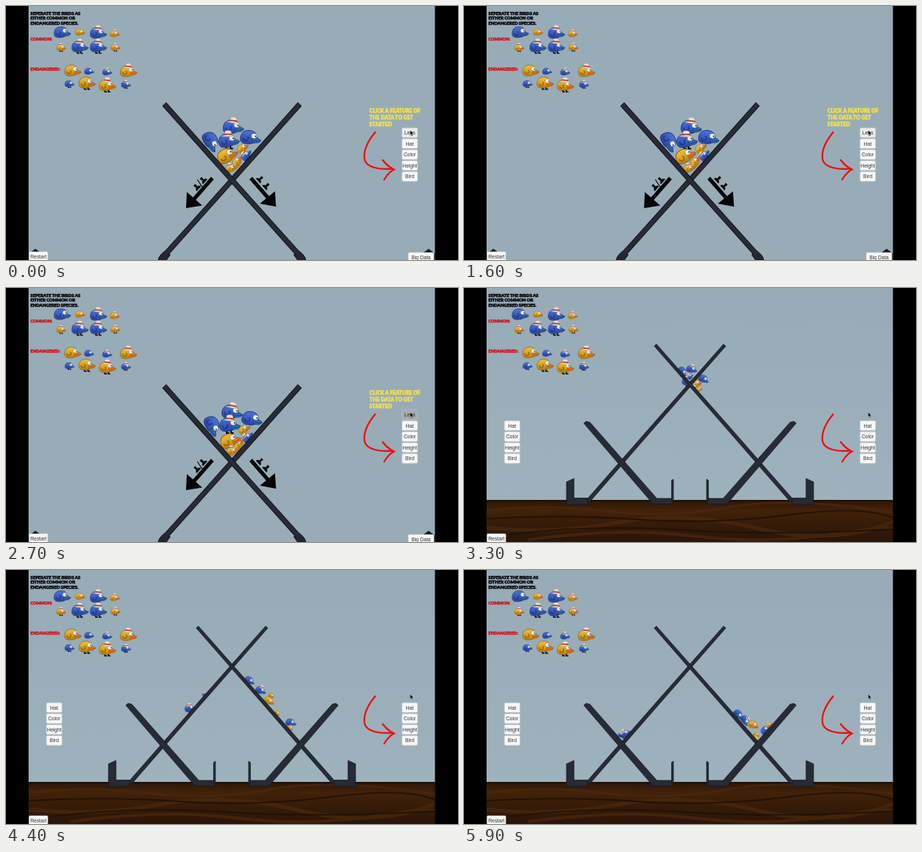
An HTML page that plays this animation: 600 px wide and 338 px high, repeating every 6 s.

```html
<!DOCTYPE html>
<html lang="en">
<head>
<meta charset="utf-8">
<title>Sort the birds</title>
<style>
html, body { margin: 0; width: 100%; height: 100%; overflow: hidden; background: #000; }
svg { display: block; width: 100vw; height: 100vh; }
.chunky { font-family: Lato, sans-serif; font-weight: 900; stroke-width: .5; }
.ui { font: 6.7px "Liberation Sans", Arial, sans-serif; fill: #323232; text-anchor: middle; }
</style>
</head>
<body>
<svg id="stage" viewBox="0 0 600 338">
  <defs>
    <linearGradient id="sky" x2="0" y2="1">
      <stop offset="0" stop-color="#97abb7"/><stop offset="1" stop-color="#9db2bc"/>
    </linearGradient>
    <linearGradient id="floor" x2="0" y2="1">
      <stop offset="0" stop-color="#2b1708"/><stop offset=".25" stop-color="#422209"/>
      <stop offset=".6" stop-color="#351b08"/><stop offset="1" stop-color="#2a1507"/>
    </linearGradient>
    <linearGradient id="blue" x2="0" y2="1">
      <stop offset="0" stop-color="#4a74d6"/><stop offset=".5" stop-color="#3a5cc4"/><stop offset="1" stop-color="#2a4298"/>
    </linearGradient>
    <linearGradient id="gold" x2="0" y2="1">
      <stop offset="0" stop-color="#efc043"/><stop offset=".5" stop-color="#dda41f"/><stop offset="1" stop-color="#b57a12"/>
    </linearGradient>
    <clipPath id="view"><rect x="30" y="0" width="539.4" height="338"/></clipPath>
    <g id="leg1">
      <path d="M211 326L218 331L213 338H202Q203 332 211 326Z" fill="#222730" stroke="#12151a"/>
      <path id="beam" d="M390 130.5L300 231.7L213 329" fill="none" stroke="#12151a" stroke-width="7.2"/>
      <path d="M389.500 131L300 231.7L212 330" fill="none" stroke="#272c36" stroke-width="5.2"/>
      <path d="M30 330L39 323L47 329V338H30Z" fill="#16181c"/>
    </g>
    <g id="half2" fill="#262b35" stroke="#14171c" stroke-width=".7">
      <path d="M344.500 74.700L347.500 77.300L256.500 181.500L167 284.500L162.500 282L253 178.500Z"/>
      <path d="M159 180L162 177.500L167 178.500L256 280H277V287.500H251Z"/>
      <path d="M275.500 256L278 254.500V284H275.500Z"/>
      <path d="M136 258L146 253.500V279.500H164V288H136Z"/>
    </g>
    <path id="foot" d="M-4.500 3Q-4 0 -1.500 -.5L-2 -5H1.500L1.200 -.5Q4 0 4.500 3Z" fill="#08090b"/>
    <g id="feet"><use href="#foot" x="-6.200"/><use href="#foot" x="6.200"/></g>
  </defs>

  <g clip-path="url(#view)">
    <g id="scene1">
      <rect x="30" width="540" height="338" fill="#98acb7"/>
      <g id="pile"></g>
      <use href="#leg1"/><use href="#leg1" transform="matrix(-1 0 0 1 600 0)"/>
      <g fill="#050506" stroke="#050506">
        <path d="M274 229L246 261M325 229L352 260" stroke-width="5"/>
        <path d="M239 269L240 247.500L260.500 265.500ZM358.500 267L357 246.500L337 263Z" stroke="none"/>
      </g>
      <use href="#feet" transform="translate(258 236.500) rotate(-48)"/>
      <path d="M254 231L262 243" stroke="#08090b" stroke-width="1.200"/>
      <use href="#feet" transform="translate(341 235.500) rotate(48)"/>
      <g class="chunky" font-size="6.800" fill="#f2e04c" stroke="#f2e04c">
        <text x="482.500" y="142">CLICK A FEATURE OF</text>
        <text x="482.500" y="151">THE DATA TO GET</text>
        <text x="482.500" y="160">STARTED</text>
      </g>
    </g>

    <g id="scene2">
      <rect x="30" width="540" height="284" fill="url(#sky)"/>
      <g id="slide"></g>
      <rect x="30" y="282" width="540" height="56" fill="url(#floor)"/>
      <g fill="none" stroke="#4b290e" stroke-width="3" opacity=".7">
        <path d="M30 296Q110 287 190 297T350 292T570 298" />
        <path d="M30 319Q120 328 205 312T390 320T570 311" stroke-width="5"/>
        <path d="M85 335Q210 318 305 330T500 326T570 332" stroke-width="4"/>
      </g>
      <g fill="none" stroke="#1c0e05" stroke-width="1.800" opacity=".8">
        <path d="M30 283H570M30 307Q130 301 230 308T430 302T570 306"/>
        <path d="M60 328Q170 314 290 322T570 321"/>
      </g>
      <use href="#half2"/><use href="#half2" transform="matrix(-1 0 0 1 600 0)"/>
    </g>

    <g class="chunky" font-size="5.700" fill="#07080a" stroke="#07080a">
      <text x="32.500" y="11.800">SEPERATE THE BIRDS AS</text>
      <text x="32.500" y="18.400">EITHER COMMON OR</text>
      <text x="32.500" y="25">ENDANGERED SPECIES.</text>
    </g>
    <g class="chunky" font-size="5.500" fill="#d3141c" stroke="#d3141c">
      <text x="32.500" y="45.500">COMMON:</text>
      <text x="32.500" y="86.300">ENDANGERED:</text>
    </g>
    <g id="legend"></g>
    <g id="buttons"></g>
    <path d="M490 168C481 179 474 192 476 204C478 215 496 218 513 216.500M500 205Q507 214 515 217.500Q508 221 502 231"
      fill="none" stroke="#f00c0c" stroke-width="2.200" stroke-linecap="round"/>
    <path d="M536.500 165.500V171.500L537.900 170.200L539 172.500L540 172L539 169.800H541Z" fill="#0a0a0a" stroke="#ddd" stroke-width=".3"/>
  </g>
</svg>
<script>
const NS = "http://www.w3.org/2000/svg";
const $ = id => document.getElementById(id);

function add(parent, tag, attrs, text) {
  const el = document.createElementNS(NS, tag);
  for (const k in attrs) el.setAttribute(k, attrs[k]);
  if (text) el.textContent = text;
  parent.appendChild(el);
  return el;
}

// Kind: B/Y big, b/y small (blue or yellow); h adds a hat, l adds legs.
function bird(parent, kind) {
  const g = add(parent, "g", {});
  const blue = /[Bb]/.test(kind);
  const [body, dark, beak] = blue ? ["url(#blue)", "#22367f", "#2f6aa8"] : ["url(#gold)", "#8f5f10", "#e0701e"];
  const path = (d, fill, line = "none", w = .6) =>
    add(g, "path", { d, fill, stroke: line, "stroke-width": w });
  if (kind.includes("l")) path("M-3 6V9.500H0M2 6V9.500H5", "none", "#0b0b0d", 1.8);
  path("M-11 2C-11 -5 -7 -8 -1 -8C5 -8 7.500 -5 8 0C8 5 3 7.500 -2 7.500C-7 8 -11 7 -11 2Z", body, dark, .8);
  path("M3 1Q8 -2 13 1.500Q12 5.500 4 5.500Q2 3.500 3 1Z", beak, dark);
  path("M4 3.300Q9 3.500 12.500 2", "none", dark, .7);
  path("M-8 1Q-7 5.500 -3 3.500Q-.5 1.500 -3 -1", "none", dark, 1.3);
  add(g, "ellipse", { cx: 4.4, cy: -2.4, rx: 3.3, ry: 3, fill: "#e6ebf0", stroke: dark, "stroke-width": .4 });
  add(g, "circle", { cx: 6, cy: -2.2, r: .8, fill: "#111" });
  if (kind.includes("h")) {
    path("M-3.500 -6.500L-3 -11Q1 -12.500 4 -10.500L4.500 -6Z", "#e9e0d0", "#9a8f80", .4);
    path("M-3.600 -8.300L4.400 -7.800V-6L-3.800 -6.500Z", "#b8322c");
    path("M-8 -5.800Q0 -7.800 8 -4.800Q1 -3.600 -8 -5.800Z", "#efe7d8", "#9a8f80", .4);
  }
  g.size = /[BY]/.test(kind) ? 1 : .58;
  return g;
}

function put(g, x, y, r = 0, scale = 1) {
  g.setAttribute("transform", `translate(${x} ${y}) rotate(${r}) scale(${g.size * scale})`);
}

const legend = [
  ["B", 74, 35], ["y", 98, 35], ["Bh", 122, 36], ["yh", 144, 37],
  ["yhl", 73, 55.5], ["Bhl", 97.5, 54], ["Bhl", 122, 54], ["yhl", 145, 55],
  ["Y", 88, 86], ["b", 110, 87], ["bh", 134, 88], ["Yh", 162, 87],
  ["bl", 84, 103.5], ["Yl", 107, 102], ["Yhl", 134, 105.5], ["bhl", 159, 104.5]
];
for (const [kind, x, y] of legend) put(bird($("legend"), kind), x, y, 0, .92);

function button(x, y, w, h, label) {
  const g = add($("buttons"), "g", {});
  g.face = add(g, "rect", { x: x - w / 2, y: y - h / 2, width: w, height: h, rx: 1.4, fill: "#f7f7f7", stroke: "#c5c9cb", "stroke-width": .5 });
  add(g, "text", { x, y: y + 2.4, class: "ui" }, label);
  return g;
}
const labels = ["Hat", "Color", "Height", "Bird"];
const column = x => labels.map((s, i) => button(x, 183.2 + i * 14.55, 20.5, 12.8, s));
const legs = button(536, 168.6, 20.5, 12.8, "Legs");
column(536);
const leftSide = column(64);
button(43, 333.5, 25, 13, "Restart");
const bigData = button(551, 334.3, 34, 12.5, "Big Data");

// Heap: id, kind, x, y, turn, then the shift as it settles.
const heap = [
  ["A", "B", 272, 180, 62, 2, 3], ["B", "Bh", 301, 161, 3, -1.5, 4],
  ["C", "B", 324, 175, 8, 2, -1], ["D", "Bhl", 295, 179, -4, 1.5, 3],
  ["F", "y", 314, 189, -35, 2, -1], ["G", "bhl", 319, 199, -58, 2, 0],
  ["H", "y", 307, 207, -60, 2, 1], ["E", "Y", 293, 199, -24, 4, 4],
  ["I", "yh", 298, 216, -15, 2, 1]
];
// Slide: x, y, turn on leaving, halfway and at rest.
const runs = {
  A: [290, 111, 45, 323, 147, 25, 364, 192, 50],
  B: [302, 108, 12, 338, 160, 20, 373, 200, 60],
  C: [318, 121, 25, 378, 203, 10, 400, 213, -42],
  D: [296, 124, -5, 244, 184, -10, 214, 218, -35],
  E: [308, 127, -10, 349, 174, 25, 384, 206, 18],
  F: [309, 119, -35, 352, 167, 30, 388, 219, 20],
  G: [300, 118, -40, 264, 165, -35, 208, 219, -15],
  H: [312, 135, -20, 360, 190, 45, 387, 223, 50],
  I: [305, 131, 0, 377, 210, 30, 405, 206, -30]
};
const birds = heap.map(([id, kind, ...pose]) => ({
  pose, run: runs[id], near: bird($("pile"), kind), far: bird($("slide"), kind)
}));

const CUT = 2800, LEAVE = 3300, MID = 4400, END = 5900;
const clamp = v => Math.max(0, Math.min(1, v));
const part = (t, a, b) => clamp((t - a) / (b - a));
const mix = (a, b, u) => a.map((v, i) => v + (b[i] - v) * u);

function heapPose([x, y, r, dx, dy], t) {
  const u = part(t, 1500, 2700);
  return [x + dx * u, y + dy * u, r + 4 * u];
}

function slidePose(b, t) {
  const [x, y, r] = heapPose(b.pose, CUT);
  const start = [300 + (x - 300) * .51, 128 + (y - 231) * .51, r];
  const leave = b.run.slice(0, 3), mid = b.run.slice(3, 6), rest = b.run.slice(6);
  if (t < LEAVE) return mix(start, leave, part(t, CUT, LEAVE));
  if (t < MID) return mix(leave, mid, part(t, LEAVE, MID) ** 1.3);
  return mix(mid, rest, 1 - (1 - part(t, MID, END)) ** 2);
}

const show = (el, on) => el.setAttribute("visibility", on ? "visible" : "hidden");

function draw(ms) {
  const t = Math.floor(ms % 6000 / 100) * 100;
  const second = t >= CUT;
  show($("scene1"), !second);
  show($("scene2"), second);
  show(legs, !second);
  show(bigData, !second);
  leftSide.forEach(b => show(b, second));
  legs.face.setAttribute("fill", t >= 2600 ? "#a9abac" : "#ececec");
  for (const b of birds) {
    if (second) put(b.far, ...slidePose(b, t), .6);
    else put(b.near, ...heapPose(b.pose, t), 1.15);
  }
}

const begin = performance.now();
function tick() {
  draw(performance.now() - begin);
  requestAnimationFrame(tick);
}
tick();
</script>
</body>
</html>
```
